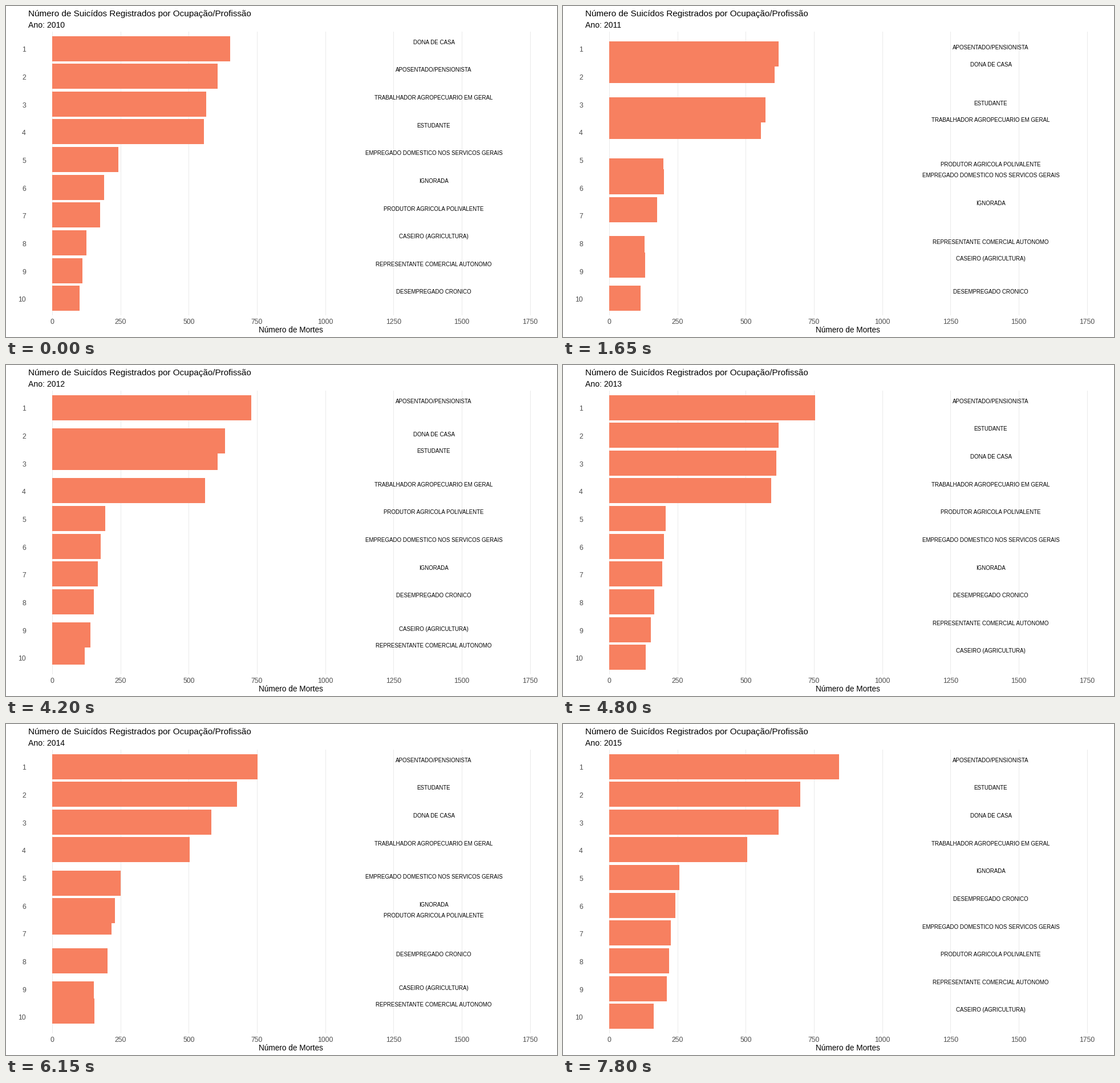
A matplotlib script that plays this animation: 966x580 px, repeating every 8 s.

```python
import matplotlib.pyplot as plt
from matplotlib.animation import FuncAnimation
from matplotlib.patches import Rectangle

W, H, DPI = 966, 580, 100
X0, X_SCALE = 81, 0.4787          # pixel of zero deaths, pixels per death
ROW_Y, ROW_STEP, BAR_H = 74.5, 48.64, 44
TICK_MS, STEP_MS, LOOP_MS = 50, 150, 8000
MOVE_STEPS, CYCLE_STEPS, LEAD_STEPS = 5, 10, 7

JOBS = {
    "A": "DONA DE CASA",
    "B": "APOSENTADO/PENSIONISTA",
    "C": "TRABALHADOR AGROPECUARIO EM GERAL",
    "D": "ESTUDANTE",
    "E": "EMPREGADO DOMESTICO NOS SERVICOS GERAIS",
    "F": "IGNORADA",
    "G": "PRODUTOR AGRICOLA POLIVALENTE",
    "H": "CASEIRO (AGRICULTURA)",
    "I": "REPRESENTANTE COMERCIAL AUTONOMO",
    "J": "DESEMPREGADO CRONICO",
}

# Jobs in ranking order with their deaths, one row per year from 2010.
YEARS = [
    ("ABCDEFGHIJ", (652, 606, 564, 556, 242, 190, 175, 125, 111, 101)),
    ("BADCGEFIHJ", (623, 593, 577, 554, 205, 189, 171, 134, 132, 119)),
    ("BADCGEFJHI", (723, 637, 602, 551, 191, 172, 161, 150, 142, 111)),
    ("BDACGEFJIH", (755, 620, 613, 594, 206, 201, 194, 164, 152, 133)),
    ("BDACEFGJHI", (750, 691, 575, 482, 262, 239, 220, 211, 158, 154)),
    ("BDACFJEGIH", (842, 699, 620, 505, 257, 242, 225, 219, 211, 162)),
]
STATES = [{job: (row, deaths[row]) for row, job in enumerate(order)}
          for order, deaths in YEARS]

plt.rcParams["font.family"] = "Liberation Sans"
fig = plt.figure(figsize=(W / DPI, H / DPI), dpi=DPI, facecolor="white")
ax = fig.add_axes([0, 0, 1, 1])
ax.set(xlim=(0, W), ylim=(H, 0))
ax.axis("off")


def px(deaths):
    return X0 + deaths * X_SCALE


def write(x, y, text, size, color="black", ha="center"):
    return ax.text(x, y, text, fontsize=size * 72 / DPI, color=color,
                   ha=ha, va="baseline", zorder=3)


write(39, 18, "Número de Suicídos Registrados por Ocupação/Profissão", 15.2, ha="left")
subtitle = write(39, 38, "", 14, ha="left")
write(499.5, 572, "Número de Mortes", 13.6)

for tick in range(0, 1751, 250):
    ax.plot([px(tick)] * 2, [45, 541], color="#EBEBEB", lw=0.75, zorder=1)
    write(px(tick), 557, str(tick), 12.2, "#4D4D4D")
for row in range(10):
    write(35, 80.5 + row * ROW_STEP, str(row + 1), 12.2, "#4D4D4D", "right")

bars = {job: ax.add_patch(Rectangle((X0, 0), 0, BAR_H, fc="#F78060", lw=0, zorder=2))
        for job in JOBS}
labels = {job: write(750, 0, name, 9.75) for job, name in JOBS.items()}


def update(frame):
    steps = max(frame * TICK_MS // STEP_MS - LEAD_STEPS, 0)
    index, step = divmod(steps, CYCLE_STEPS)
    part = min(step / MOVE_STEPS, 1)
    start, end = STATES[index], STATES[min(index + 1, len(STATES) - 1)]
    for job in JOBS:
        row, deaths = (a + (b - a) * part for a, b in zip(start[job], end[job]))
        y = ROW_Y + row * ROW_STEP
        bars[job].set_y(y - BAR_H / 2)
        bars[job].set_width(deaths * X_SCALE)
        labels[job].set_y(y - 7.8)
    subtitle.set_text(f"Ano: {2010 + index + (part > 0.5)}")
    return [*bars.values(), *labels.values(), subtitle]


anim = FuncAnimation(fig, update, frames=LOOP_MS // TICK_MS, interval=TICK_MS,
                     repeat=True, repeat_delay=0, blit=False)
plt.show()
```
